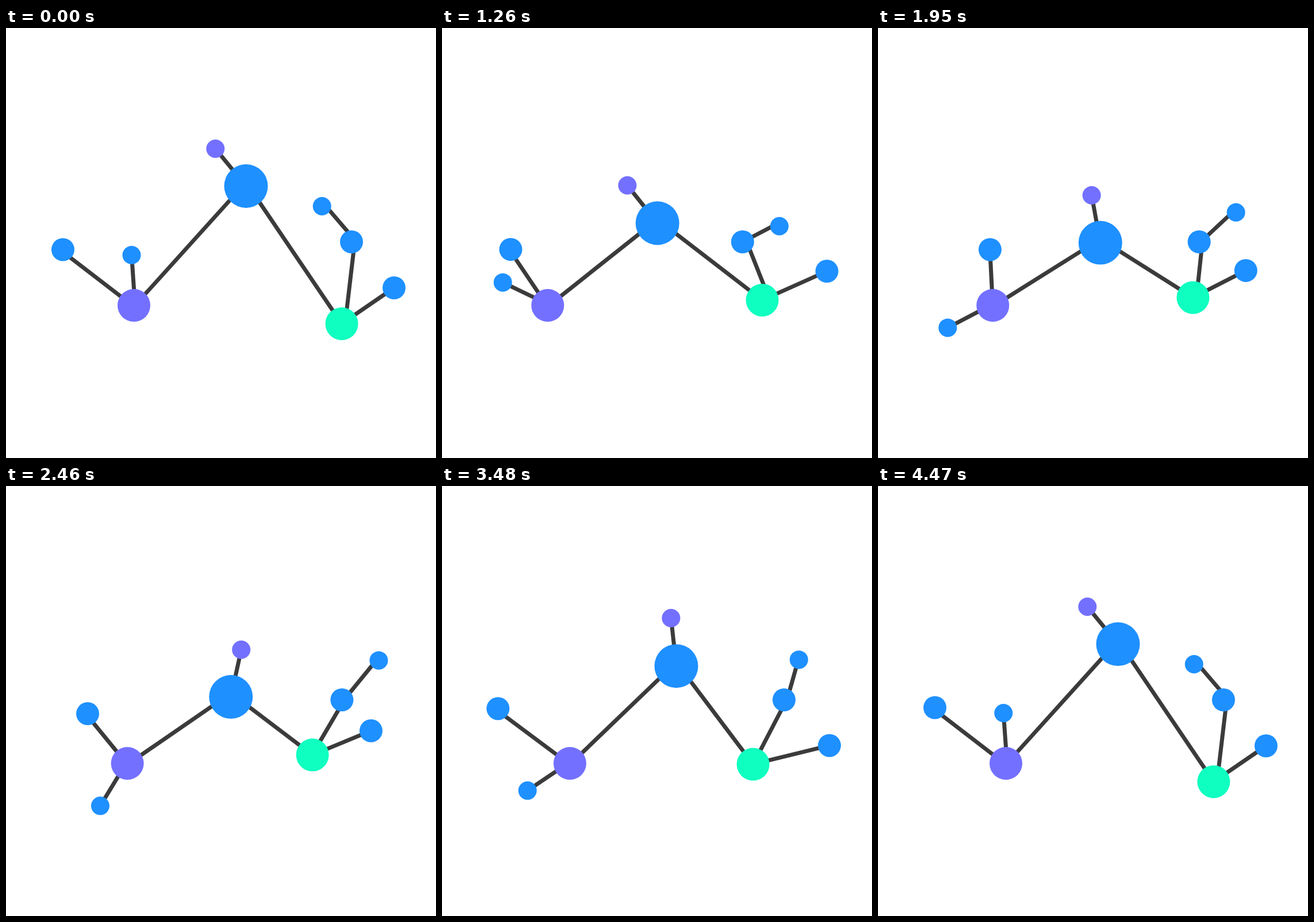
Animation of 748x748 px, one loop 4500 ms. Source, as an HTML page:

```html
<!DOCTYPE html>
<html lang="en">
<head>
<meta charset="utf-8">
<title>Network</title>
<style>
  html, body { margin: 0; width: 100%; height: 100%; overflow: hidden; background: #fff; }
  svg { display: block; width: 100%; height: 100%; }
  line { stroke: #3b3b3b; stroke-width: 7; }
</style>
</head>
<body>
<svg id="stage" viewBox="0 0 748 748"></svg>
<script>
const LOOP = 4500, STEP = 30;
const BLUE = '#1e90ff', PURPLE = '#7370ff', GREEN = '#0fffc0';
const BIG = 38, MAIN = 28.5, MID = 20, SMALL = 16;

const stage = document.getElementById('stage');

function make(tag, attrs) {
  const el = document.createElementNS('http://www.w3.org/2000/svg', tag);
  set(el, attrs);
  return el;
}

function set(el, attrs) {
  for (const k in attrs) el.setAttribute(k, attrs[k]);
}

function ease(s) {
  s = Math.min(1, Math.max(0, s));
  return s * s * (3 - 2 * s);
}

// Eased trip through the stops [time, x, y] and back to the first one at time `end`.
// Each inner stop has curve handles parallel to the line between its neighbours.
function route(bend, end, ...stops) {
  stops.push([end, stops[0][1], stops[0][2]]);
  const handle = i => [1, 2].map(n =>
    i > 0 && i < stops.length - 1 ? bend * (stops[i + 1][n] - stops[i - 1][n]) / 6 : 0);
  const legs = stops.slice(1).map((b, i) => {
    const a = stops[i], [ax, ay] = handle(i), [bx, by] = handle(i + 1);
    const path = make('path', {
      d: `M${a[1]} ${a[2]}C${a[1] + ax} ${a[2] + ay} ${b[1] - bx} ${b[2] - by} ${b[1]} ${b[2]}`
    });
    return { path, from: a[0], to: b[0], length: path.getTotalLength() };
  });
  return t => {
    const leg = legs.find(l => t < l.to) || legs[legs.length - 1];
    const p = leg.path.getPointAtLength(leg.length * ease((t - leg.from) / (leg.to - leg.from)));
    return [p.x, p.y];
  };
}

const curve = (...args) => route(1, ...args);
const straight = (...args) => route(0, ...args);

// Angle from straight up: leaves rest at `from`, peaks at `turn`, is back at the loop's end.
function sway(rest, peak, from, turn) {
  return t => {
    const s = t < turn ? (t - from) / (turn - from) : (LOOP - t) / (LOOP - turn);
    return (rest + (peak - rest) * ease(s)) * Math.PI / 180;
  };
}

const routes = {
  hub: curve(LOOP, [0, 417.5, 275], [900, 376, 328.5], [2100, 388.5, 372.3]),
  left: straight(3500, [0, 222.5, 482.5], [900, 180.8, 482.5], [2840, 214.5, 482.5]),
  right: curve(LOOP, [0, 584, 514.5], [1400, 556, 472.5], [3000, 528.5, 473]),
  west: curve(3650, [930, 99, 385.5], [2050, 197, 386], [2800, 100, 400.5]),
  joint: straight(LOOP, [0, 601, 372], [900, 516, 372], [2840, 592, 372]),
  tip: straight(LOOP, [0, 549.7, 310], [900, 580, 349.4], [2840, 656, 298.3]),
  east: curve(3600, [0, 675, 452], [800, 679.5, 426], [2300, 634, 424])
};

// Nodes hung on a parent; the rod's foot sits `lean` px beside the parent's centre.
const swings = {
  top: { parent: 'hub', r: 84, lean: 0, angle: sway(-39.3, 15.9, 1150, 2700) },
  low: { parent: 'left', r: 87.6, lean: 2, angle: sway(-2.6, -161, 0, 3000) }
};

const looks = {
  hub: [BIG, BLUE], left: [MAIN, PURPLE], right: [MAIN, GREEN],
  west: [MID, BLUE], joint: [MID, BLUE], east: [MID, BLUE],
  tip: [SMALL, BLUE], top: [SMALL, PURPLE], low: [SMALL, BLUE]
};

// Where rods are fixed, relative to a node's centre; `socket` is a second spot on the right node.
const pins = { hub: [0, -6.5], left: [0, 2], west: [0, 4], joint: [6, -3], tip: [1, -6.7], socket: [7.5, -14] };

const rods = [
  ['hub', 'left'], ['hub', 'right'], ['west', 'left'], ['right', 'east'],
  ['joint', 'socket'], ['tip', 'joint'], ['top', 'topFoot'], ['low', 'lowFoot']
].map(([a, b]) => ({ a, b, el: stage.appendChild(make('line', {})) }));

const dots = Object.entries(looks).map(([id, [r, fill]]) =>
  ({ id, el: stage.appendChild(make('circle', { r, fill })) }));

function place(t) {
  const pos = {};
  for (const id in routes) pos[id] = routes[id](t);
  pos.socket = pos.right;
  for (const id in swings) {
    const { parent, r, lean, angle } = swings[id];
    const [x, y] = pos[parent], c = Math.cos(angle(t)), s = Math.sin(angle(t));
    pos[id] = [x + r * s, y - r * c];
    pos[id + 'Foot'] = [x + lean * c, y + lean * s];
  }
  return pos;
}

function draw(t) {
  const pos = place(t);
  const pin = id => pos[id].map((v, n) => v + (pins[id] ? pins[id][n] : 0));
  for (const { a, b, el } of rods) {
    const [x1, y1] = pin(a), [x2, y2] = pin(b);
    set(el, { x1, y1, x2, y2 });
  }
  for (const { id, el } of dots) set(el, { cx: pos[id][0], cy: pos[id][1] });
}

let start = null;
function tick(now) {
  if (start === null) start = now;
  const t = Math.max(0, now - start) % LOOP;
  draw(Math.floor(t / STEP) * STEP);
  requestAnimationFrame(tick);
}
draw(0);
requestAnimationFrame(tick);
</script>
</body>
</html>
```
